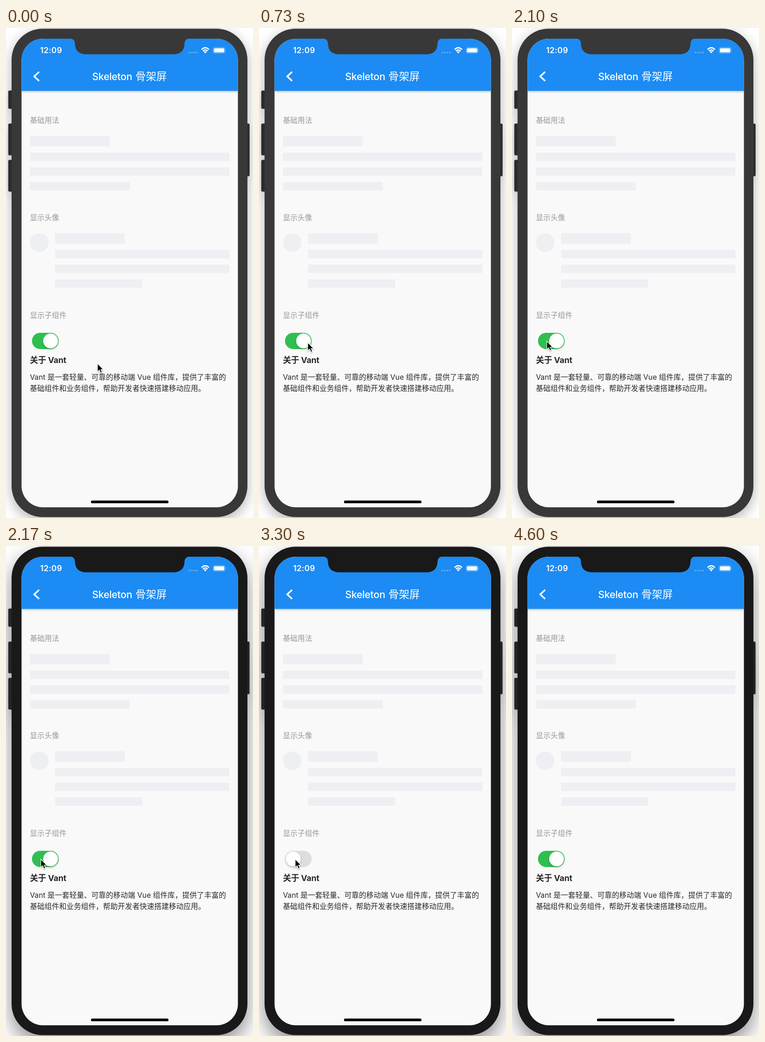
An HTML page for the animation above (4.63 s loop, 532 by 1053 pixels).

```html
<!DOCTYPE html>
<html lang="zh-CN">
<head>
<meta charset="utf-8">
<title>Skeleton 骨架屏</title>
<style>
html, body { margin: 0; width: 100%; height: 100%; overflow: hidden; background: #fff; }
svg { display: block; width: 100vw; height: 100vh; }
text { font-family: Inter, "Noto Sans CJK SC", "Noto Sans CJK", sans-serif; font-size: 15.75px; white-space: pre; }
#phone { --body: #383838; --key: #2b2b2b; --shade: drop-shadow(0 8px 14px rgba(0,0,0,.3)); }
#phone.active { --body: #191919; --key: #242424; --shade: drop-shadow(0 18px 22px rgba(0,0,0,.45)); }
.case { filter: var(--shade); }
.body { fill: var(--body); }
.key { fill: var(--key); stroke: #555; stroke-width: .6; }
.label { fill: #969799; }
.copy { fill: #29292b; }
.bars { fill: #eeeff3; }
.white { fill: #fff; }
</style>
</head>
<body>
<svg viewBox="0 0 532 1053" preserveAspectRatio="none">
  <defs>
    <clipPath id="screen"><rect x="33.5" y="23" width="466" height="1007" rx="46"/></clipPath>
    <filter id="soft" x="-30%" y="-30%" width="160%" height="190%">
      <feDropShadow dx="0" dy="2.5" stdDeviation="2.6" flood-opacity=".2"/>
    </filter>
    <filter id="bar" x="-5%" y="-5%" width="110%" height="120%">
      <feDropShadow dx="0" dy="1.5" stdDeviation="2" flood-opacity=".3"/>
    </filter>
    <filter id="drop" x="-50%" y="-50%" width="200%" height="200%">
      <feDropShadow dx="0" dy="1.5" stdDeviation="1.2" flood-opacity=".35"/>
    </filter>
  </defs>

  <g id="phone">
    <g class="case">
      <g class="key">
        <rect x="5" y="134.5" width="12" height="39" rx="2.5"/>
        <rect x="5" y="205.5" width="12" height="68" rx="2.5"/>
        <rect x="5" y="283.5" width="12" height="68" rx="2.5"/>
        <rect x="514" y="205.5" width="10.5" height="113" rx="2.5"/>
      </g>
      <rect class="body" x="12" y="1.5" width="508" height="1049.5" rx="67"/>
    </g>
    <g clip-path="url(#screen)">
      <rect x="33" y="23" width="467" height="1008" fill="#f9f9f9"/>
      <rect x="33" y="20" width="467" height="115" fill="#1e8bf3" filter="url(#bar)"/>
    </g>
    <path class="body" d="M137 22.5Q148.5 23 148.5 34Q149.500 56.500 173 56.500H360Q383.500 56.500 384.500 34Q384.500 23 396 22.500Z"/>
  </g>

  <g class="white">
    <text x="73.5" y="54" style="font-size:17.2px;font-weight:600;letter-spacing:.3px">12:09</text>
    <g id="dots" opacity=".32"></g>
    <g fill="none" stroke="#fff" stroke-width="2.7">
      <path d="M421.200 46.300Q429.200 38.600 437.200 46.300M424.200 49.500Q429.200 44.900 434.200 49.500"/>
    </g>
    <path d="M426 51.300Q429.200 48.500 432.400 51.300L429.200 54.600Z"/>
    <rect x="446" y="41.900" width="26" height="12.300" rx="3.600" fill="none" stroke="#fff" opacity=".45"/>
    <rect x="447.800" y="43.600" width="22.400" height="8.900" rx="2.200"/>
    <path d="M473.500 46Q475.300 48 473.500 50Z" opacity=".5"/>
    <text x="185.500" y="111.500" style="font-size:21.4px;font-weight:500;letter-spacing:-.3px">Skeleton</text>
    <text x="278.800" y="111.800" style="font-size:22.5px;font-weight:500">骨架屏</text>
  </g>
  <path d="M71.300 94.200L60.800 104L71.300 113.800" fill="none" stroke="#fff" stroke-width="3.6"/>

  <g class="label">
    <text x="51.500" y="204">基础用法</text>
    <text x="51.500" y="413">显示头像</text>
    <text x="51.500" y="622.500">显示子组件</text>
  </g>
  <g class="bars" id="bars"><circle cx="71.600" cy="461.300" r="20.100"/></g>
  <g class="bars" id="loading"></g>
  <g class="copy" id="about">
    <text x="51.500" y="720" style="font-size:17.7px;font-weight:700;letter-spacing:-.15px">关于 Vant</text>
    <text x="51.500" y="756">Vant 是一套轻量、可靠的移动端 Vue 组件库，提供了丰富的</text>
    <text x="51.500" y="779.700">基础组件和业务组件，帮助开发者快速搭建移动应用。</text>
  </g>

  <rect id="track" x="56" y="655" width="57.400" height="34.900" rx="17.450"/>
  <circle id="knob" class="white" cy="672.400" r="15.900" filter="url(#soft)"/>
  <rect x="183" y="1015.500" width="167" height="5.800" rx="2.900"/>
  <path id="cursor" filter="url(#drop)" stroke="#fff" stroke-width="1.200"
    d="M0 0V17.800L4.100 14L6.900 20.600L10 19.300L7.300 12.900H12.700Z"/>
</svg>
<script>
const LOOP = 4630, ACTIVE = 2130;
const HIDE = 2180, SHOW = 3200;      // child content is replaced by bars, then returns
const OFF = 2240, ON = 3290, SLIDE = 200;
const GONE = 4000;                   // pointer disappears

// time, x, y of the pointer's tip
const path = [[0, 197, 721], [230, 197, 721], [690, 105, 676], [1080, 105, 676],
  [1300, 90, 677], [1640, 90, 677], [1950, 75, 673], [2900, 75, 673], [3150, 78, 673], [LOOP, 78, 673]];

const $ = id => document.getElementById(id);
const clamp = v => Math.max(0, Math.min(1, v));
const ease = v => v * v * (3 - 2 * v);
const mix = (a, b, k) => a + (b - a) * k;

function add(parent, tag, attrs) {
  const el = document.createElementNS('http://www.w3.org/2000/svg', tag);
  for (const key in attrs) el.setAttribute(key, attrs[key]);
  $(parent).append(el);
}

function skeleton(parent, x, y) {
  const full = 481 - x;
  const row = (dy, part, height) => add(parent, 'rect', { x, y: y + dy, width: full * part, height });
  row(0, .4, 22.5);
  [1, 1, .5].forEach((part, i) => row(36 + 31.5 * i, part, 18));
}

skeleton('bars', 51.7, 232);
skeleton('bars', 105.7, 441);
skeleton('loading', 51.7, 700.7);
for (let i = 0; i < 4; i++) add('dots', 'circle', { cx: 395 + i * 5.4, cy: 52.7, r: 1.8 });

function pointer(t) {
  const i = path.findIndex(p => p[0] > t);
  const [t0, x0, y0] = path[i - 1], [t1, x1, y1] = path[i];
  const k = ease((t - t0) / (t1 - t0));
  return [mix(x0, x1, k), mix(y0, y1, k)];
}

function draw() {
  const t = performance.now() % LOOP;
  const loading = t >= HIDE && t < SHOW;
  const on = 1 - ease(clamp((t - OFF) / SLIDE)) + ease(clamp((t - ON) / SLIDE));
  $('phone').classList.toggle('active', t >= ACTIVE);
  $('loading').style.display = loading ? '' : 'none';
  $('about').style.display = loading ? 'none' : '';
  $('knob').setAttribute('cx', mix(73.4, 96, on));
  $('track').setAttribute('fill', `rgb(${mix(222, 47, on)},${mix(222, 191, on)},${mix(223, 80, on)})`);
  $('cursor').setAttribute('transform', `translate(${pointer(t)})`);
  $('cursor').style.display = t < GONE ? '' : 'none';
  requestAnimationFrame(draw);
}
draw();
</script>
</body>
</html>
```
